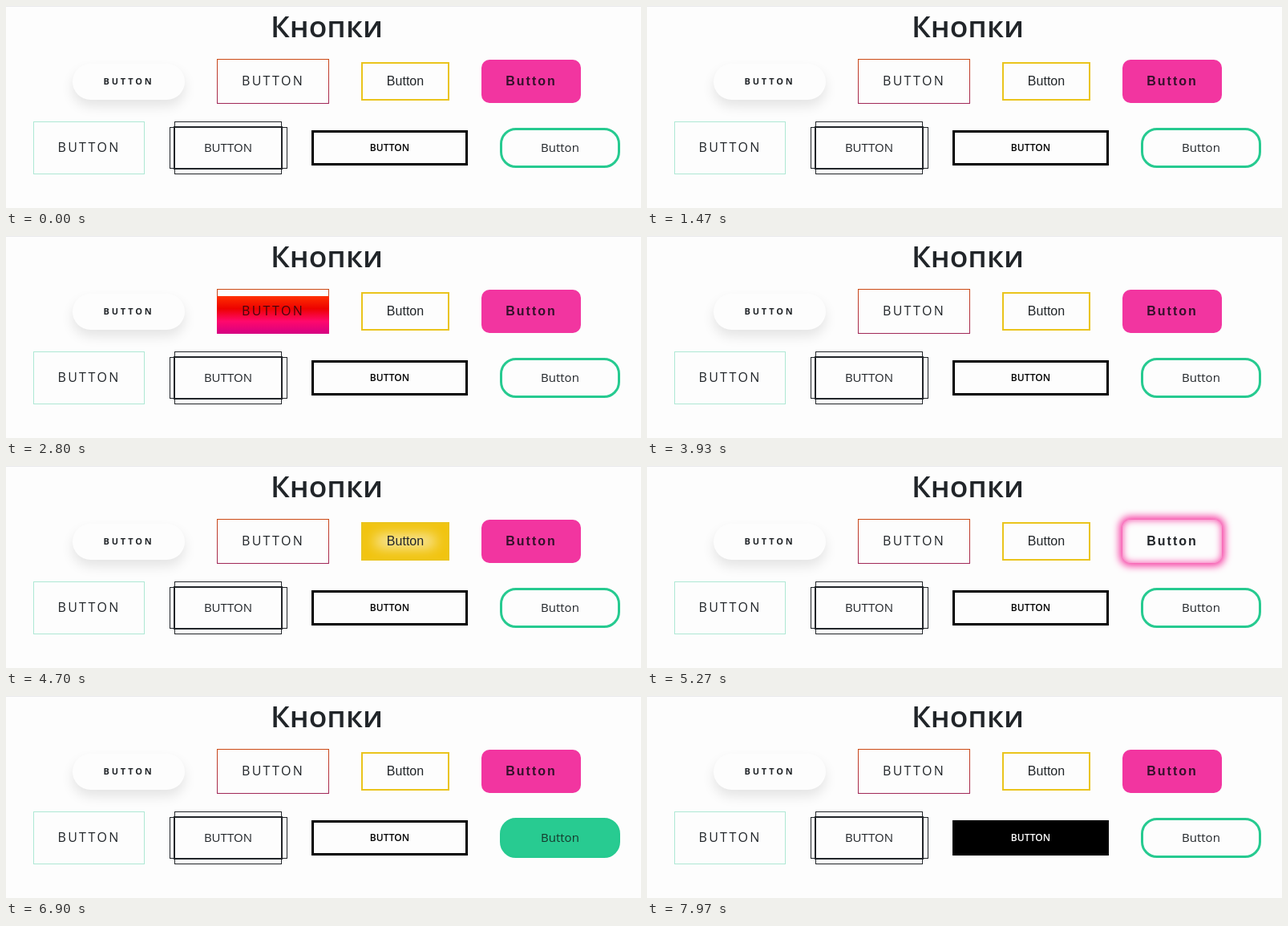
Write an HTML page that moves like this. It is 792 px wide and 252 px high and loops after 8 s.

```html
<!DOCTYPE html>
<html lang="ru">
<head>
<meta charset="utf-8">
<title>Кнопки</title>
<style>
  :root { --ink: #212529; --paper: #fdfdfd; --loop: 8s ease infinite; }
  * { box-sizing: border-box; margin: 0; }
  html, body { width: 100%; height: 100%; overflow: hidden; background: var(--paper); }
  .stage {
    position: relative; width: 792px; height: 252px; overflow: hidden;
    border-top: 1px solid #e9e9ec;
    font-family: "Open Sans", "Noto Sans", sans-serif; color: var(--ink);
  }
  h1, .btn {
    position: absolute; display: flex; align-items: center; justify-content: center;
    white-space: nowrap;
  }
  /* Offsets count from below the 1px top rule. */
  h1 { left: 0; top: 3px; width: 800px; height: 40px; font-size: 37px; font-weight: 600; }
  .btn { font-size: 16px; padding-bottom: 2px; }
  .arial { font-family: "Liberation Sans", Arial, sans-serif; padding: 0; }
  .wide { letter-spacing: 2.3px; }

  .lift {
    left: 83px; top: 71px; width: 140px; height: 45px; border-radius: 45px;
    font-size: 11px; font-weight: 700; letter-spacing: 2.8px;
    animation: lift var(--loop);
  }
  @keyframes lift {
    0%, 18.375%, 30.375%, 100% {
      background: var(--paper); color: var(--ink); transform: none;
      box-shadow: 0 8px 15px rgba(0, 0, 0, .1);
    }
    22.5%, 26.625% {
      background: #2ee59d; color: #14452f; transform: translateY(-7px);
      box-shadow: 0 15px 20px rgba(46, 229, 157, .4);
    }
  }

  .rise {
    z-index: 0; left: 263px; top: 65px; width: 140px; height: 56px;
    border: 1px solid; border-image: linear-gradient(#cc4a14, #b83438, #a02858) 1;
    animation: rise-text var(--loop);
  }
  .rise::before {
    content: ""; position: absolute; z-index: -1; left: -1px; right: -1px; bottom: -1px;
    background: linear-gradient(#ff3000, #ed0200, #ff096c, #d50082);
    animation: rise var(--loop);
  }
  @keyframes rise {
    0%, 31.625%, 47.125%, 100% { height: 0; }
    37.875%, 40.875% { height: 56px; }
  }
  @keyframes rise-text {
    0%, 31.625%, 47.125%, 100% { color: var(--ink); }
    37.875%, 40.875% { color: #4a0008; }
  }

  .flood {
    left: 443px; top: 69px; width: 110px; height: 48px; border: 2px solid #eac41c;
    animation: flood var(--loop);
  }
  @keyframes flood {
    0%, 49.125%, 61.25%, 100% { box-shadow: inset 0 0 0 0 #f1c40f; }
    53.375%, 57.5% { box-shadow: inset 0 0 40px 40px #f1c40f; }
  }

  .glow {
    left: 593px; top: 66px; width: 124px; height: 54px; border-radius: 10px;
    font-weight: 700; letter-spacing: 2px; animation: glow var(--loop);
  }
  @keyframes glow {
    0%, 61.875%, 75.375%, 100% {
      background: #f235a0; color: #34112a;
      box-shadow: inset 0 0 0 0 #f640a4, 0 0 0 0 #f640a4;
    }
    65.875%, 73.75% {
      background: var(--paper); color: var(--ink);
      box-shadow: inset 0 0 10px 0 #f640a4, 0 0 10px 4px #f640a4;
    }
  }

  .pale { left: 34px; top: 143px; width: 139px; height: 66px; border: 1px solid #aee8d4; }

  .cross {
    left: 209px; top: 149px; width: 136px; height: 54px; border: 1px solid var(--ink);
    font-size: 15px;
  }
  .cross::before, .cross::after { content: ""; position: absolute; border: 1px solid var(--ink); }
  .cross::before { inset: 0 -7px 0 -6px; }
  .cross::after { inset: -7px 0; }

  .invert {
    left: 381px; top: 154px; width: 195px; height: 44px; border: 3px solid #000;
    font-size: 12px; font-weight: 600; animation: invert var(--loop);
  }
  @keyframes invert {
    0%, 97.125% { background: var(--paper); color: #000; }
    99.625%, 100% { background: #000; color: #fff; }
  }

  .fill {
    left: 616px; top: 151px; width: 150px; height: 50px; border-radius: 20px;
    border: 3px solid #26ca90; font-size: 15px; animation: fill var(--loop);
  }
  @keyframes fill {
    0%, 80.875%, 90.375%, 100% { background: var(--paper); color: var(--ink); }
    87.125%, 90% { background: #26ca90; color: #16382c; }
  }
</style>
</head>
<body>
<div class="stage">
  <h1>Кнопки</h1>
  <div class="btn lift">BUTTON</div>
  <div class="btn rise wide">BUTTON</div>
  <div class="btn flood arial">Button</div>
  <div class="btn glow arial">Button</div>
  <div class="btn pale wide">BUTTON</div>
  <div class="btn cross">BUTTON</div>
  <div class="btn invert">BUTTON</div>
  <div class="btn fill">Button</div>
</div>
</body>
</html>
```
